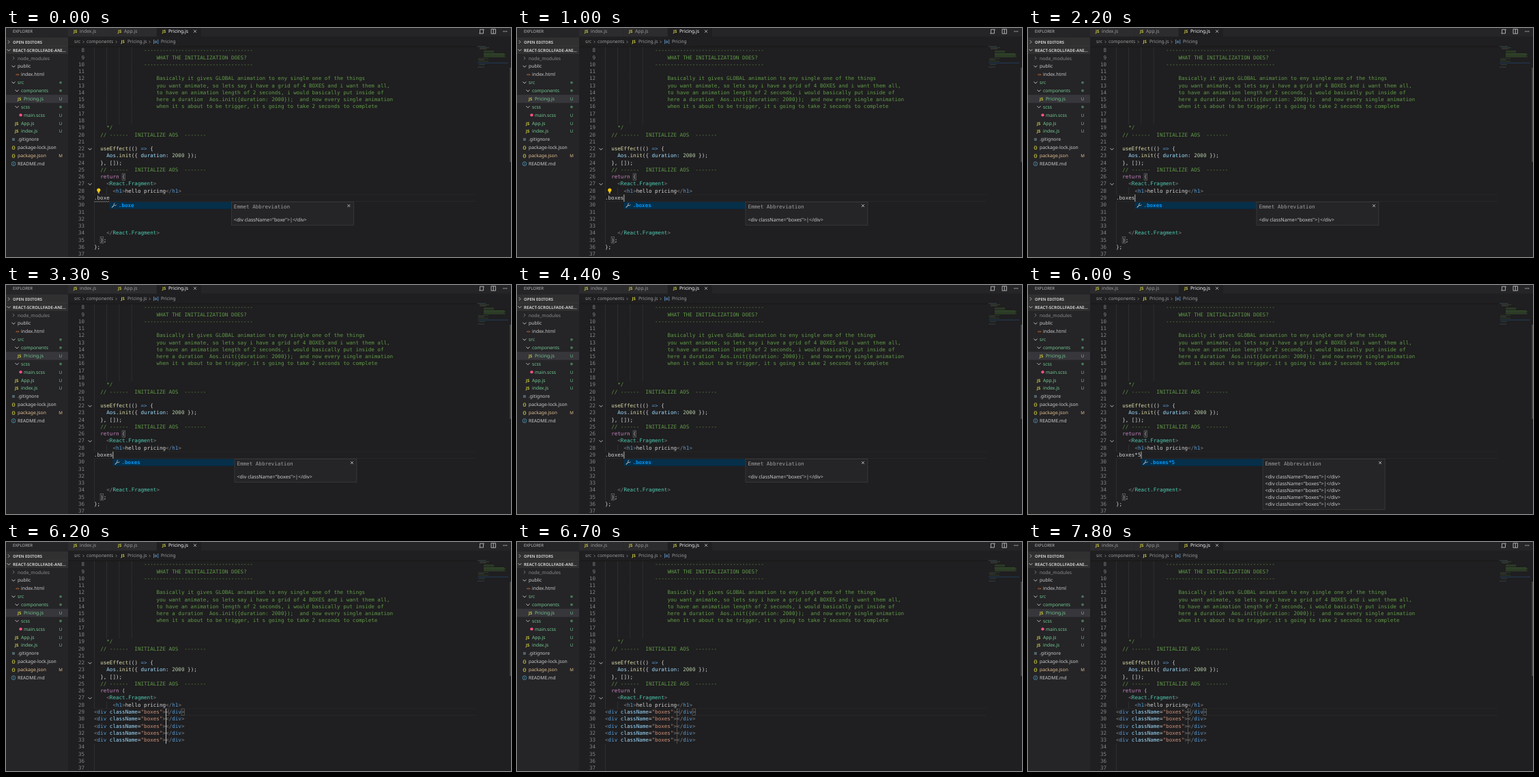
Recreate the animation shown at these times as an HTML page with a canvas. Size 740 by 335 pixels, loop 8000 ms.

```html
<!DOCTYPE html>
<html lang="en">
<head>
<meta charset="utf-8">
<title>Code editor</title>
<style>
html, body { margin: 0; width: 740px; height: 335px; overflow: hidden; background: #1f1e20; }
canvas { display: block; }
</style>
</head>
<body>
<canvas id="stage" width="740" height="335"></canvas>
<script>
const ctx = document.getElementById('stage').getContext('2d');
const LOOP = 8000, CHAR = 4.57, LEFT = 129, PITCH = 10.27;
const MONO = '7.59px "DejaVu Sans Mono", monospace';
const MONO_BOLD = 'bold ' + MONO;
const sans = (size, weight = 400) => `${weight} ${size}px "Noto Sans", "Open Sans", sans-serif`;
const COLORS = {
  c: '#609a48', w: '#d4d4d4', y: '#dcdcaa', b: '#569cd6', v: '#9cdcfe',
  n: '#b5cea8', p: '#c586c0', t: '#4ec9b0', g: '#808080', s: '#ce9178'
};
const GREEN = '#73c991', GREY = '#a0a0a0', LIGHT = '#cccccc', YELLOW = '#cbcb41';
const EDITOR = '#1f1e20', PANEL = '#252427';

const colX = col => LEFT + col * CHAR;
const rowY = row => 33 + (row - 8) * PITCH;

function rect(x, y, w, h, color) {
  ctx.fillStyle = color;
  ctx.fillRect(x, y, w, h);
}

function outline(x, y, w, h, color, width = 0.6) {
  ctx.strokeStyle = color;
  ctx.lineWidth = width;
  ctx.strokeRect(x, y, w, h);
}

function text(str, x, y, color, font, align = 'left') {
  ctx.font = font;
  ctx.fillStyle = color;
  ctx.textAlign = align;
  ctx.fillText(str, x, y + 2.3);
}

function path(points, color, width = 0.8) {
  ctx.strokeStyle = color;
  ctx.lineWidth = width;
  ctx.beginPath();
  points.forEach(([x, y]) => ctx.lineTo(x, y));
  ctx.stroke();
}

function disc(x, y, r, color) {
  ctx.fillStyle = color;
  ctx.beginPath();
  ctx.arc(x, y, r, 0, 7);
  ctx.fill();
}

function ring(x, y, r, color) {
  ctx.strokeStyle = color;
  ctx.lineWidth = 0.8;
  ctx.beginPath();
  ctx.arc(x, y, r, 0, 7);
  ctx.stroke();
}

const chevronRight = (x, y, color = LIGHT, s = 2.3) =>
  path([[x - s / 2, y - s], [x + s / 2, y], [x - s / 2, y + s]], color);
const chevronDown = (x, y, color = LIGHT, s = 2.5) =>
  path([[x - s, y - s / 2], [x, y + s / 2], [x + s, y - s / 2]], color, 0.9);

function cross(x, y, color) {
  path([[x - 2, y - 2], [x + 2, y + 2]], color);
  path([[x - 2, y + 2], [x + 2, y - 2]], color);
}

const jsIcon = (x, y) => text('JS', x + 0.5, y, YELLOW, sans(6, 700));

// Each part is a colour key, a space, then the text.
function code(row, col, ...parts) {
  for (const part of parts) {
    const str = part.slice(2);
    text(str, colX(col), rowY(row), COLORS[part[0]], MONO);
    col += str.length;
  }
}

const ICONS = {
  js: jsIcon,
  html: (x, y) => text('<>', x - 1, y, '#e37933', sans(5, 700)),
  sass: (x, y) => disc(x + 2.5, y, 2.2, '#f55385'),
  git: (x, y) => rect(x - 1, y - 2, 4, 4, '#4f626b'),
  json: (x, y) => text('{}', x - 1.5, y, YELLOW, sans(6.5, 700)),
  info: (x, y) => {
    ring(x + 1, y, 2.9, '#519aba');
    rect(x + 0.6, y - 0.6, 0.8, 2.2, '#519aba');
    rect(x + 0.6, y - 1.8, 0.8, 0.8, '#519aba');
  }
};

// name, text x, icon or fold state, colour, status
const TREE = [
  ['node_modules', 17, 'closed', '#8c8c8c'],
  ['public', 17, 'open', LIGHT],
  ['index.html', 22, 'html', LIGHT],
  ['src', 17, 'open', GREEN, '•'],
  ['components', 22, 'open', GREEN, '•'],
  ['Pricing.js', 26, 'js', GREEN, 'U'],
  ['scss', 22, 'open', GREEN, '•'],
  ['main.scss', 26, 'sass', GREEN, 'U'],
  ['App.js', 22, 'js', GREEN, 'U'],
  ['index.js', 22, 'js', GREEN, 'U'],
  ['.gitignore', 17, 'git', LIGHT],
  ['package-lock.json', 17, 'json', LIGHT],
  ['package.json', 17, 'json', '#e2c08d', 'M'],
  ['README.md', 17, 'info', LIGHT]
];

function sidebar() {
  rect(0, 0, 91, 335, PANEL);
  text('EXPLORER', 10, 4.6, '#bbbbbb', sans(6));
  rect(0, 14, 91, 24, '#303031');
  rect(0, 26, 91, 0.6, '#3a3a3b');
  chevronRight(4, 20.5);
  text('OPEN EDITORS', 10, 20.5, LIGHT, sans(5.9, 700));
  chevronDown(4, 32.3);
  text('REACT-SCROLLFADE-ANI…', 10, 32.3, LIGHT, sans(6.1, 700));
  rect(0, 97.7, 91, 11.9, '#37363b');
  TREE.forEach(([name, x, icon, color, status], i) => {
    const y = 44.2 + i * 11.88;
    if (icon === 'open') chevronDown(x - 6, y);
    else if (icon === 'closed') chevronRight(x - 6, y, '#8c8c8c');
    else ICONS[icon](x - (icon === 'js' ? 9.5 : 7), y);
    text(name, x, y, color, sans(6.8));
    if (status === '•') disc(80, y, 1.9, '#477657');
    else if (status) text(status, 80, y, color, sans(6.2), 'center');
  });
}

function header() {
  rect(91, 0, 649, 12.5, PANEL);
  rect(91, 0, 64, 12.5, '#2c2b2d');
  rect(155.5, 0, 65, 12.5, '#2c2b2d');
  rect(221, 0, 65, 12.5, EDITOR);
  [['index.js', 98.5, '#9a9a9a'], ['App.js', 163.5, '#9a9a9a'], ['Pricing.js', 228.5, '#ffffff']]
    .forEach(([name, x, color]) => {
      jsIcon(x, 4.6);
      text(name, x + 9.5, 4.6, color, sans(6.8));
    });
  cross(277, 4.8, LIGHT);

  // toolbar
  path([[698.5, 2.2], [694.5, 2.2], [694.5, 6.5]], LIGHT);
  path([[695.5, 8], [699.5, 8], [699.5, 3.7]], LIGHT);
  ring(694.5, 7.6, 0.8, LIGHT);
  ring(699.5, 2.6, 0.8, LIGHT);
  outline(711, 1.8, 6.5, 6.4, LIGHT, 0.8);
  path([[714.3, 2], [714.3, 8]], LIGHT);
  [729, 731.3, 733.6].forEach(x => disc(x, 5, 0.7, LIGHT));

  // breadcrumbs
  const font = sans(6.7);
  text('src', 100, 20, GREY, font);
  text('components', 118, 20, GREY, font);
  text('Pricing.js', 178, 20, GREY, font);
  text('Pricing', 227, 20, GREY, font);
  [113.5, 161.5, 210.5].forEach(x => chevronRight(x, 20.3, '#888888', 1.7));
  jsIcon(168, 20);
  text('[', 215.4, 20, '#75beff', font);
  text(']', 221.5, 20, '#75beff', font);
  ring(219.5, 20.3, 1.3, '#75beff');
  rect(91, 27, 598, 1, '#191919');
}

function minimap() {
  rect(691, 26.7, 12, 0.7, '#3f5666');
  rect(694, 28.5, 14, 0.7, '#40523a');
  rect(694, 30, 10, 0.7, '#505044');
  for (let i = 0; i < 3; i++) rect(700, 33 + i * 1.3, 15, 0.6, '#35502c');
  for (let i = 0; i < 5; i++) rect(700, 37.4 + i * 1.1, 30 + i * 2 % 3, 0.6, '#3d6230');
  rect(692, 44.5, 15, 0.6, '#35502c');
  rect(692, 46.2, 9, 0.6, '#505044');
  rect(692, 48.5, 15, 0.6, '#35502c');
  rect(691, 50.7, 45, 0.8, '#22456a');
  rect(693, 53, 9, 0.6, '#33574f');
  rect(691, 56.8, 10, 0.6, '#46535a');
  rect(738.3, 58, 1.7, 138, '#4a4a4a');
}

function guides(expanded) {
  const depth = row => row < 19 ? 4 : row < 28 ? 1 : row === 28 ? 2 :
    row === 29 || (expanded && row < 34) ? 0 : row < 36 || expanded ? 1 : 0;
  for (let row = 8; row < 38; row++) {
    for (let i = 0; i < depth(row); i++) {
      rect(colX(i * 4), Math.max(28, rowY(row) - PITCH / 2), 0.6, PITCH, '#3a3a3a');
    }
  }
}

const COMMENT = [
  'Basically it gives GLOBAL animation to eny single one of the things',
  'you want animate, so lets say i have a grid of 4 BOXES and i want them all,',
  'to have an animation length of 2 seconds, i would basically put inside of',
  'here a duration  Aos.init({duration: 2000});  and now every single animation',
  'when it s about to be trigger, it s going to take 2 seconds to complete'
];

function listing(expanded) {
  for (let row = 8; row < 38; row++) {
    text(row, 115, rowY(row), '#858585', MONO, 'right');
  }
  rect(LEFT, rowY(29) - 5.1, 559, 0.7, '#2b2b2b');
  rect(LEFT, rowY(29) + 4.8, 559, 0.7, '#2b2b2b');
  const rule = 'c ' + '-'.repeat(35);
  const title = 'c // ------  INITIALIZE AOS  -------';
  code(8, 16, rule);
  code(9, 20, 'c WHAT THE INITIALIZATION DOES?');
  code(10, 16, rule);
  COMMENT.forEach((str, i) => code(12 + i, 20, 'c ' + str));
  code(19, 4, 'c */');
  code(20, 2, title);
  code(22, 2, 'y useEffect', 'w (() ', 'b =>', 'w  {');
  code(23, 4, 'v Aos', 'w .', 'y init', 'w ({ ', 'v duration:', 'w  ', 'n 2000', 'w  });');
  code(24, 2, 'w }, []);');
  code(25, 2, title);
  code(26, 2, 'p return', 'w  (');
  code(27, 4, 'g <', 't React.Fragment', 'g >');
  code(28, 6, 'g <', 'b h1', 'g >', 'w hello pricing', 'g </', 'b h1', 'g >');
  if (expanded) return;
  code(34, 4, 'g </', 't React.Fragment', 'g >');
  code(35, 2, 'w );');
  code(36, 0, 'w };');
  [[26, 9], [35, 2]].forEach(([row, col]) =>
    outline(colX(col), rowY(row) - 4.8, CHAR, 9.4, '#777777'));
}

function bulb() {
  disc(135.8, 237, 2.6, '#ffcc00');
  rect(134.6, 239, 2.4, 1.6, '#ffcc00');
  rect(134.7, 241, 2.2, 0.8, '#d4d4d4');
}

function popup(abbr, count) {
  const x = colX(abbr.length), side = x + 178.5, top = 254.5;
  rect(x, top, 178.5, 10.3, '#062f4a');
  path([[x + 3.2, 262.7], [x + 7, 258.9]], '#a5b3bc', 1.2);
  ctx.strokeStyle = '#a5b3bc';
  ctx.lineWidth = 0.9;
  ctx.beginPath();
  ctx.arc(x + 8, 258, 1.8, 0.2, 4.6);
  ctx.stroke();
  text(abbr, x + 13, 259.7, '#0097fb', MONO_BOLD);

  const height = 24 + count * 10;
  rect(side, top, 179, height, PANEL);
  outline(side, top, 179, height, '#454545');
  text('Emmet Abbreviation', side + 3.5, 262, '#a0a0a0', MONO);
  cross(side + 172, 260, LIGHT);
  const name = abbr.slice(1).split('*')[0];
  for (let i = 0; i < count; i++) {
    text(`<div className="${name}">|</div>`, side + 3.5, 280.7 + i * 10, LIGHT, sans(7.15));
  }
}

function squiggle(cols) {
  const points = [];
  for (let x = LEFT; x < colX(cols); x += 1.5) points.push([x, 253.3 + points.length % 2 * 1.3]);
  path(points, '#a5a5a5', 0.6);
}

const caret = (col, row = 29) => rect(colX(col), rowY(row) - 5, 0.9, PITCH, '#c8c8c6');

function expansion() {
  for (let row = 29; row < 34; row++) {
    code(row, 0, 'g <', 'b div', 'w  ', 'v className', 'w =', 's "boxes"', 'g ></', 'b div', 'g >');
    rect(colX(23), rowY(row) - 5, 0.6, PITCH, '#777777');
  }
  outline(colX(23), rowY(29) - 4.6, CHAR, 9.2, '#5c5c5c');
  outline(colX(28), rowY(29) - 4.6, CHAR, 9.2, '#707070');
}

// start time, abbreviation, preview lines
const KEYS = [[0, '.boxe', 1], [1000, '.boxes', 1], [4600, '.boxes*', 1], [5600, '.boxes*5', 5]];
const BULB_END = 1250, EXPAND = 6200;
const blinkOn = age => age % 1000 < 500;

function draw(t) {
  const expanded = t >= EXPAND;
  ctx.textRendering = 'geometricPrecision';
  rect(0, 0, 740, 335, EDITOR);
  guides(expanded);
  listing(expanded);
  ctx.globalAlpha = 1 - Math.min(1, Math.max(0, (t - 7300) / 500));
  [22, 27].forEach(row => chevronDown(123, rowY(row) + 0.3));
  ctx.globalAlpha = 1;
  if (expanded) {
    expansion();
    if (blinkOn(t - EXPAND)) for (let row = 29; row < 34; row++) caret(23, row);
  } else {
    const [start, abbr, count] = KEYS.filter(key => key[0] <= t).pop();
    code(29, 0, 'w ' + abbr);
    if (t < BULB_END) bulb();
    if (start) {
      if (blinkOn(t - start)) caret(abbr.length);
    } else squiggle(abbr.length);
    popup(abbr, count);
  }
  header();
  sidebar();
  minimap();
}

const begin = performance.now();
function tick() {
  draw((performance.now() - begin) % LOOP);
  requestAnimationFrame(tick);
}
tick();
</script>
</body>
</html>
```
